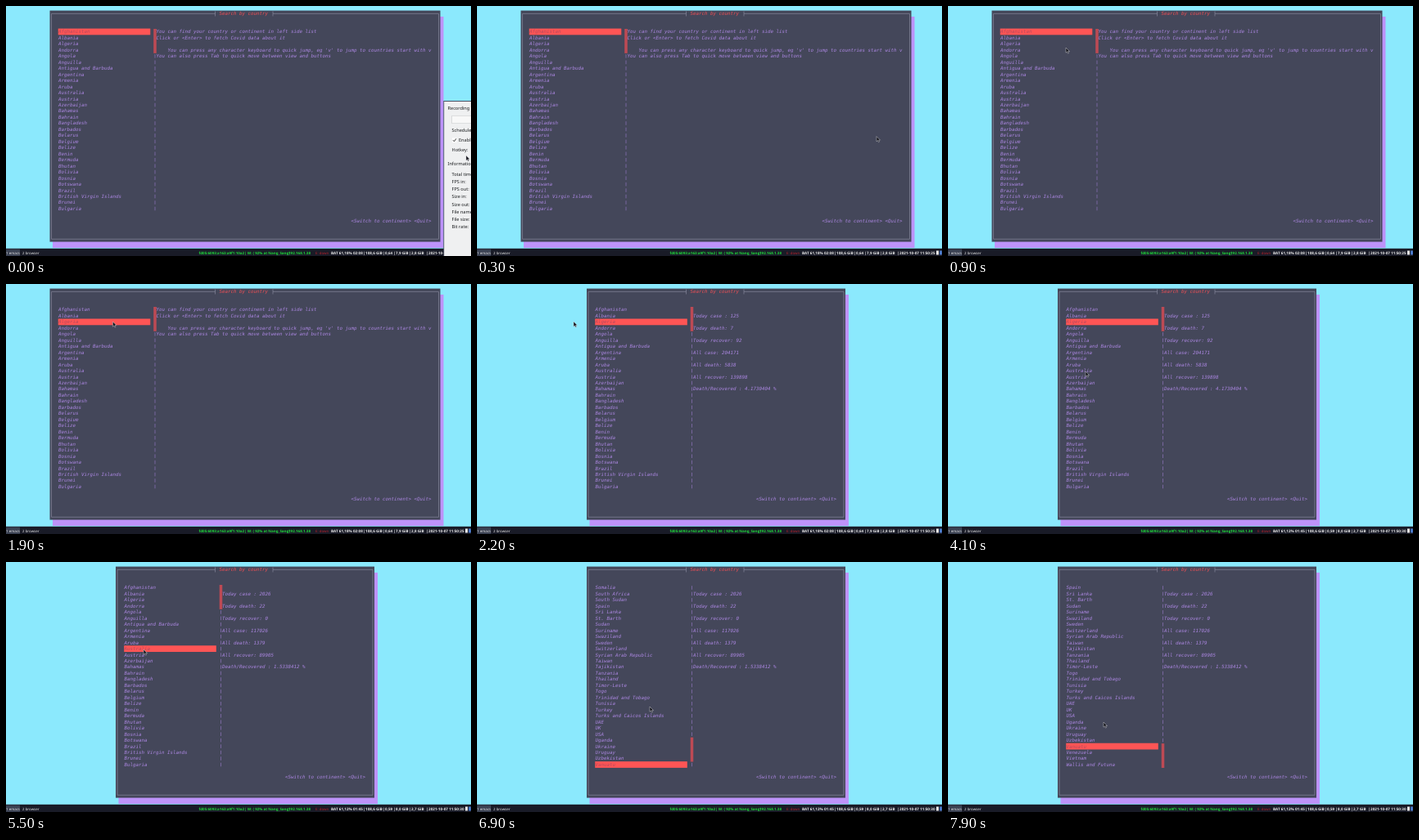
An HTML page for the animation above (8000 ms loop, 568 by 306 pixels).

```html
<!DOCTYPE html>
<html lang="en">
<head>
<meta charset="utf-8">
<title>Search by country</title>
<style>
  html, body { margin: 0; width: 100%; height: 100%; overflow: hidden; background: #8be9fd; }
  svg { display: block; width: 568px; height: 306px; }
  text { white-space: pre; text-rendering: geometricPrecision; }
  .term text { font: italic 5.82px "DejaVu Sans Mono", monospace; fill: #ac87e2; }
  .term .title { fill: #ee5056; }
  .term .picked { fill: #b54a5e; }
  .frame { fill: none; stroke: #9092a6; stroke-width: .6; }
  .track { stroke: #9a7ccd; stroke-width: .6; stroke-dasharray: 4.6 2.866; }
  .bar text { font: 4.4px "Noto Sans", sans-serif; fill: #e8e8e8; }
  .bar #status text { font-size: 4.6px; font-weight: bold; }
  .bar .net { font-size: 4.5px; font-weight: 600; fill: #1fd83a; }
  .bar .down { fill: #b3202a; }
  .dialog text { font: 5.6px "Noto Sans", sans-serif; fill: #1c1e20; }
</style>
</head>
<body>
<svg viewBox="0 0 568 306">
  <rect width="568" height="306" fill="#8be9fd"/>
  <g id="scenes" class="term"></g>
  <g class="bar">
    <rect y="296.8" width="568" height="9.2" fill="#191b27"/>
    <rect y="297.5" width="17" height="8.5" fill="#3a4152"/>
    <text x="0" y="304">1 emacs</text>
    <text x="20" y="304">2 browser</text>
    <text x="235.5" y="304" class="net">fd05:6093:a163:a9f1:10a2</text>
    <text x="291" y="304" class="net">| W: ( 92% at Nang_Sang)</text>
    <text x="345" y="304" class="net">192.168.1.38</text>
    <text x="378" y="304" class="down">E: down</text>
    <g id="status"></g>
    <rect x="561" y="299.5" width="3" height="5" fill="#e8e8e8"/>
    <rect x="565" y="299.5" width="3" height="5" fill="#4a78c8"/>
  </g>
  <g id="dialog" class="dialog"></g>
  <path id="cursor" d="M0 0V6.2L1.5 4.9 2.5 7.1 3.5 6.6 2.6 4.5H4.5Z" fill="#14151c" stroke="#d8d8de" stroke-width=".45"/>
</svg>
<script>
const LOOP = 8000, CHAR = 3.5, ROW = 7.466, TOP = 28, VISIBLE = 30;
const $ = id => document.getElementById(id);
const esc = s => s.replace(/&/g, '&amp;').replace(/</g, '&lt;').replace(/>/g, '&gt;');
const text = (x, y, s, cls = '') => `<text x="${x}" y="${y}" class="${cls}">${esc(s)}</text>`;
const rect = (x, y, w, h, fill) => `<rect x="${x}" y="${y}" width="${w}" height="${h}" fill="${fill}"/>`;
const rowTop = r => TOP + r * ROW;
const rowText = (x, r, s, cls) => text(x, rowTop(r) + 5.4, s, cls);

const first = ('Afghanistan,Albania,Algeria,Andorra,Angola,Anguilla,Antigua and Barbuda,Argentina,Armenia,' +
  'Aruba,Australia,Austria,Azerbaijan,Bahamas,Bahrain,Bangladesh,Barbados,Belarus,Belgium,Belize,Benin,' +
  'Bermuda,Bhutan,Bolivia,Bosnia,Botswana,Brazil,British Virgin Islands,Brunei,Bulgaria').split(',');
const last = ('Somalia,South Africa,South Sudan,Spain,Sri Lanka,St. Barth,Sudan,Suriname,Swaziland,Sweden,' +
  'Switzerland,Syrian Arab Republic,Taiwan,Tajikistan,Tanzania,Thailand,Timor-Leste,Togo,' +
  'Trinidad and Tobago,Tunisia,Turkey,Turks and Caicos Islands,UAE,UK,USA,Uganda,Ukraine,Uruguay,' +
  'Uzbekistan,Vanuatu,Venezuela,Vietnam,Wallis and Futuna').split(',');

const help = [
  'You can find your country or continent in left side list',
  'Click or <Enter> to fetch Covid data about it',
  '',
  "    You can press any character keyboard to quick jump, eg 'v' to jump to countries start with v",
  'You can also press Tab to quick move between view and buttons'
];
const report = (...v) => ['Today case : ', 'Today death: ', 'Today recover: ', 'All case: ',
  'All death: ', 'All recover: ', 'Death/Recovered : '].flatMap((label, i) => ['', label + v[i]]);
const algeria = report(125, 7, 92, 204171, 5838, 139898, '4.1730404 %');
const australia = report(2026, 22, 0, 117026, 1379, 89905, '1.5338412 %');

function terminal({ wide, list = first, from = 0, pick, thumb = 0, info }) {
  const x = wide ? 53.5 : 134, w = wide ? 477 : 316, right = x + w;
  const listX = x + 10.5, trackX = x + 128.5;
  const rows = list.slice(from, from + VISIBLE);
  return rect(x + CHAR, 13, w + .5, 283, '#bd93f9') +
    rect(x, 5.6, w, 283, '#44475a') +
    `<path class="frame" d="M255.5 9.4H${x + 2}V285.3H${right - 2}V9.4H326M255.5 6.5V12.5M326 6.5V12.5"/>` +
    text(260.5, 11.3, 'Search by country', 'title') +
    rect(listX - .3, rowTop(pick) - .4, 32 * CHAR + .6, ROW + .3, '#ff5555') +
    rows.map((s, r) => rowText(listX, r, s, r === pick ? 'picked' : '')).join('') +
    `<path class="track" d="M${trackX} ${TOP + 1.2}V${rowTop(VISIBLE)}"/>` +
    rect(trackX - CHAR / 2, rowTop(thumb), CHAR, 4 * ROW, '#bd4a54') +
    info.map((s, r) => s && rowText(x + 130, r, s)).join('') +
    text(right - 109, 265, '<Switch to continent> <Quit>');
}

const status = (bat, load, used, free, clock) =>
  [[397, `BAT ${bat}`], [439, '108,6 GiB'], [463, load], [476, `${used} GiB`], [495, `${free} GiB`],
   [516, `2021-10-07 ${clock}`]].map(([x, s], i) => text(x, 304, s) + (i ? text(x - 2.8, 304, '|') : '')).join('');

function dialog() {
  const info = ['Total time:', 'FPS in:', 'FPS out:', 'Size in:', 'Size out:', 'File name:', 'File size:', 'Bit rate:'];
  return rect(534.3, 116, 34, 190, '#4d5061') + rect(535.2, 117, 33, 189, '#eff0f1') +
    rect(544.5, 134, 24, 10, '#c4c6c8') + rect(545, 134.5, 24, 9, '#f8f8f8') +
    rect(545, 161.5, 5.5, 5.5, '#fff') +
    '<path d="M546 164.2L547.4 165.8 549.8 162.4" fill="none" stroke="#222" stroke-width=".9"/>' +
    text(539.5, 126.7, 'Recording') + text(544.5, 153.8, 'Schedule') +
    text(553, 166, 'Enable') + text(544.5, 178.2, 'Hotkey:') + text(539.5, 194.8, 'Information') +
    info.map((s, i) => text(544.5, 207.7 + i * 9.2, s)).join('');
}

// [start, markup]; each entry holds until the next one starts
const scenes = [
  [0, { wide: true, pick: 0, info: help }],
  [1300, { wide: true, pick: 2, info: help }],
  [2000, { pick: 2, info: algeria }],
  [4700, { pick: 10, info: algeria }],
  [5100, { pick: 10, info: australia }],
  [6400, { list: last, pick: 29, thumb: 25, info: australia }],
  [7300, { list: last, from: 3, pick: 26, thumb: 26, info: australia }]
].map(([at, s]) => [at, terminal(s)]);
const bars = [
  [0, status('61,18% 02:08', '0,64', '7,9', '2,8', '11:50:25')],
  [3000, status('61,12% 01:45', '0,59', '8,0', '2,7', '11:50:30')]
];
const dialogs = [[0, dialog()], [300, '']];

// time, x, y
const path = [
  [0, 562, 183], [100, 562, 183], [850, 144, 51], [1100, 144, 51], [1300, 143, 46], [1700, 143, 46],
  [2100, 118, 46], [3500, 118, 46], [4050, 168, 107], [5500, 168, 107], [5850, 184, 142],
  [6000, 184, 142], [6850, 211, 177], [7000, 211, 177], [7850, 190, 196], [LOOP, 190, 196]
];

function cursorAt(t) {
  const i = path.findIndex(p => p[0] > t);
  const [t0, x0, y0] = path[i - 1], [t1, x1, y1] = path[i];
  const u = (t - t0) / (t1 - t0), k = u * u * (3 - 2 * u);
  return [x0 + (x1 - x0) * k, y0 + (y1 - y0) * k];
}

const shown = {};
function put(id, steps, t) {
  const html = steps.filter(s => s[0] <= t).pop()[1];
  if (shown[id] !== html) $(id).innerHTML = shown[id] = html;
}

const start = performance.now();
function draw() {
  const t = (performance.now() - start) % LOOP;
  put('scenes', scenes, t);
  put('status', bars, t);
  put('dialog', dialogs, t);
  $('cursor').setAttribute('transform', `translate(${cursorAt(t)})`);
  requestAnimationFrame(draw);
}
draw();
</script>
</body>
</html>
```
